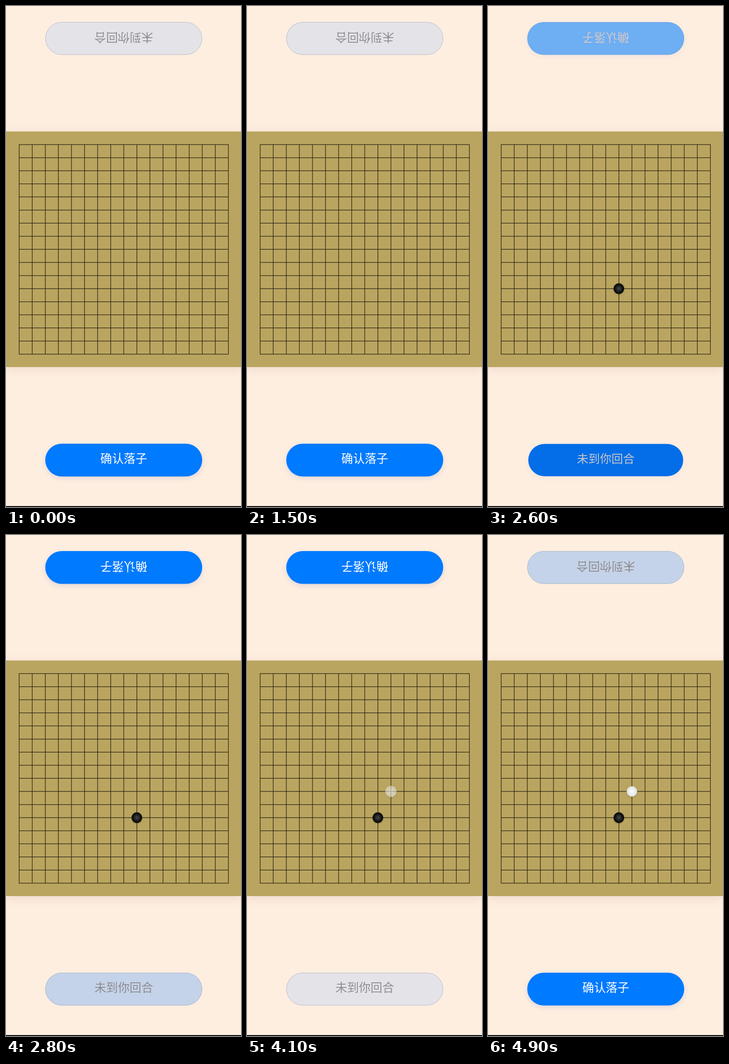
Write an HTML page that moves like this. It is 513 by 1092 pixels and loops after 5000 ms.

```html
<!DOCTYPE html>
<html lang="zh-CN">
<head>
<meta charset="utf-8">
<style>
  html, body { margin: 0; width: 100%; height: 100%; overflow: hidden; background: #feeee0; }
  svg { display: block; width: 100%; height: 100%; }
  text { font: 500 25.6px "Noto Sans CJK SC", "Noto Sans CJK", sans-serif; text-anchor: middle; }
  .board { filter: drop-shadow(0 4px 10px rgba(90, 40, 20, .1)); }
  .stone { filter: drop-shadow(0 1px 1.5px rgba(0, 0, 0, .3)); }
</style>
</head>
<body>
<svg viewBox="0 0 513 1092">
  <defs>
    <radialGradient id="black"><stop offset="0" stop-color="#484848"/><stop offset=".75" stop-color="#101010"/><stop offset="1" stop-color="#080808"/></radialGradient>
    <radialGradient id="white"><stop offset="0" stop-color="#fff"/><stop offset="1" stop-color="#dedede"/></radialGradient>
  </defs>
  <rect width="513" height="1092" fill="#feeee0"/>
  <rect class="board" y="273.5" width="513" height="513.5" fill="#b9a55f"/>
  <path d="M.5 273.5V787" stroke="#b5ad94"/>
  <path id="grid" fill="none" stroke="#2b2013" stroke-width="1.25" stroke-linecap="square"/>
  <g id="stones"></g>
  <g id="buttons"></g>
  <rect y="1090" width="513" height="2" fill="#000"/>
</svg>
<script>
const LOOP = 5000, FIRST_MOVE = 1700, TURN = 2100, CLICK = 900;
const STEP = 28.55, LEFT = 28.7, TOP = 302, LINES = 17;
const $ = id => document.getElementById(id);

function add(parent, tag, attrs) {
  const el = document.createElementNS('http://www.w3.org/2000/svg', tag);
  set(el, attrs);
  return parent.appendChild(el);
}
function set(el, attrs) {
  for (const key in attrs) el.setAttribute(key, attrs[key]);
}

const span = STEP * (LINES - 1);
$('grid').setAttribute('d', Array.from({ length: LINES }, (_, i) =>
  `M${LEFT} ${TOP + i * STEP}h${span}M${LEFT + i * STEP} ${TOP}v${span}`).join(''));

const stones = [['black', 9, 11], ['white', 10, 9]].map(([id, col, row]) => {
  const spot = add($('stones'), 'g', { transform: `translate(${LEFT + col * STEP} ${TOP + row * STEP})` });
  return add(spot, 'circle', { class: 'stone', r: 11.5, fill: `url(#${id})` });
});

// Player 0 sits at the bottom, player 1 upside down at the top.
const buttons = [[989.7, 996, 0], [70.7, 59, 180]].map(([y, baseline, turn]) => {
  const group = add($('buttons'), 'g', {});
  return {
    y, group,
    pill: add(group, 'rect', { x: -171.3, y: -35.7, width: 342.6, height: 71.4, rx: 35.7 }),
    rim: add(group, 'rect', { x: -170.8, y: -35.2, width: 341.6, height: 70.4, rx: 35.2, fill: 'none', stroke: '#8e95a5' }),
    label: add(group, 'text', { transform: `translate(0 ${baseline - y}) rotate(${turn})` })
  };
});

const BLUE = [0, 122, 255], GREY = [228, 227, 232], WHITE = [255, 255, 255], DIM = [142, 142, 147];

// Rows: time in turn, scale, rim opacity, shadow opacity, fill, label colour
const PRESS = [
  [600, 1, 0, .12, BLUE, WHITE],
  [700, .985, 0, .1, [0, 112, 235], WHITE],
  [800, .975, 0, .07, [0, 102, 215], WHITE],
  [900, .987, 0, .05, [3, 110, 232], [199, 199, 202]],
  [1000, .997, .25, .03, [102, 164, 241], [160, 156, 160]],
  [1100, 1, .5, 0, [196, 211, 233], [144, 139, 143]],
  [1200, 1, .5, 0, [220, 223, 232], DIM],
  [1300, 1, .5, 0, GREY, DIM]
];
const WAKE = [
  [800, 1, .5, 0, GREY, DIM],
  [900, 1, .25, .05, [110, 174, 243], [208, 199, 200]],
  [1000, 1, 0, .1, [24, 134, 253], [245, 243, 243]],
  [1100, 1, 0, .12, BLUE, WHITE]
];

const mix = (a, b, k) => Array.isArray(a) ? a.map((v, i) => mix(v, b[i], k)) : a + (b - a) * k;

function sample(rows, time) {
  const next = rows.findIndex(row => row[0] >= time);
  if (next === 0) return rows[0];
  if (next < 0) return rows[rows.length - 1];
  const a = rows[next - 1], b = rows[next], k = (time - a[0]) / (b[0] - a[0]);
  return a.map((v, i) => mix(v, b[i], k));
}

function drawButton({ y, group, pill, rim, label }, rows, time, ready) {
  const [, scale, rimAlpha, shadow, fill, ink] = sample(rows, time);
  set(group, { transform: `translate(257 ${y}) scale(${scale})` });
  set(pill, { fill: `rgb(${fill})` });
  pill.style.filter = `drop-shadow(0 4px 6px rgba(0,60,160,${shadow}))`;
  set(rim, { opacity: rimAlpha });
  set(label, { fill: `rgb(${ink})` });
  label.textContent = ready ? '确认落子' : '未到你回合';
}

function drawStone(stone, time) {
  const preview = time < CLICK;
  const pulse = preview ? (1 - Math.cos((time + 100) / 1000 * 2 * Math.PI)) / 2 : 0;
  set(stone, {
    visibility: time < 0 ? 'hidden' : 'visible',
    opacity: preview ? .7 - .15 * pulse : 1,
    transform: `scale(${1 + .1 * pulse})`
  });
}

function draw(now) {
  const t = Math.floor(now % LOOP / 100) * 100;
  const player = t < FIRST_MOVE + TURN ? 0 : 1;
  const time = t - FIRST_MOVE - player * TURN;
  const clicked = time >= CLICK;
  drawButton(buttons[player], PRESS, time, !clicked);
  drawButton(buttons[1 - player], WAKE, time, clicked);
  stones.forEach((stone, i) => drawStone(stone, t - FIRST_MOVE - i * TURN));
}

const start = performance.now();
function tick() {
  draw(performance.now() - start);
  requestAnimationFrame(tick);
}
tick();
</script>
</body>
</html>
```
